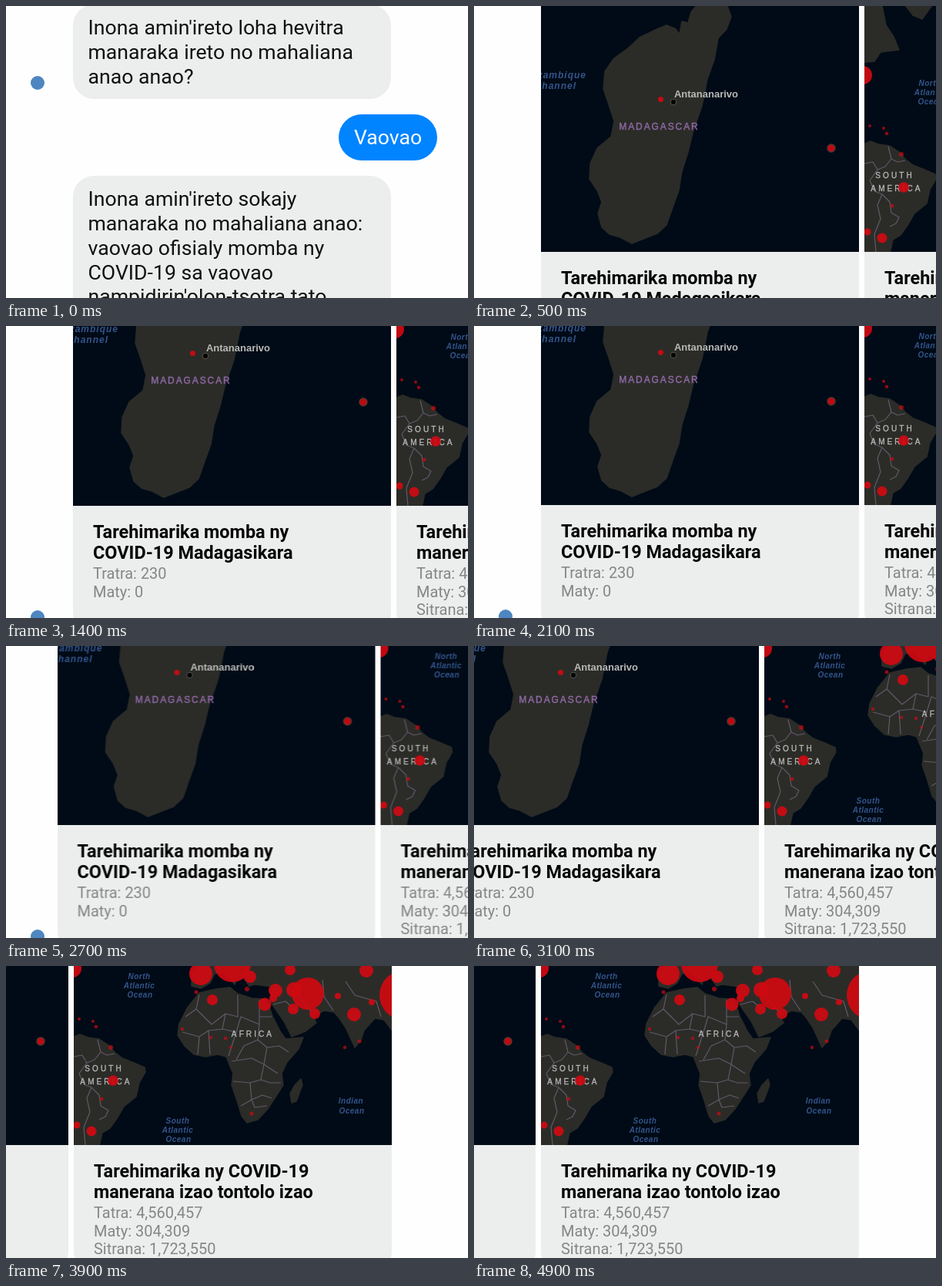
Write an HTML page that moves like this. It is 600x380 px and loops after 5000 ms.

```html
<!DOCTYPE html>
<html lang="mg">
<head>
<meta charset="utf-8">
<title>Chat</title>
<style>
html, body { margin: 0; width: 100%; height: 100%; overflow: hidden; background: #fefefe; }
body { position: relative; font-family: Roboto, sans-serif; color: #111; }
#stage { position: absolute; inset: 0; width: 600px; height: 380px; overflow: hidden; }
#chat, #cards { position: absolute; left: 0; top: 0; }
#chat { animation: scroll 5s step-end infinite; }
#cards { top: 507px; animation: swipe 5s step-end infinite; }

.msg, .me, .card, .avatar { position: absolute; box-sizing: border-box; }
.msg, .me { font-size: 26.65px; line-height: 31.7px; white-space: nowrap; }
.msg { left: 87px; width: 413px; padding: 15.4px 0 0 19.5px; border-radius: 27px; background: #eceeed; }
.me { left: 432px; top: 141px; width: 128px; height: 60px; border-radius: 30px;
  background: #0084ff; color: #fff; line-height: 61.5px; text-align: center; }
.avatar { left: 32px; width: 18px; height: 18px; border-radius: 50%; background: #4d86c0; }

.card { width: 413px; height: 579px; border-radius: 27px; overflow: hidden; background: #eceeed; white-space: nowrap; }
.card svg { display: block; background: #010b17; }
.card h2 { margin: 21px 0 0 26px; font-size: 23.45px; line-height: 27px; font-weight: 700; color: #060606; }
.card p { margin: 2.4px 0 0 26px; font-size: 19.95px; line-height: 23.2px; color: #858686; }

svg { font-family: "Liberation Sans", Arial, sans-serif; text-anchor: middle; }
svg > * { filter: blur(.5px); }
.land { fill: #2b2c28; stroke: #2b2c28; stroke-width: 1.5; stroke-linejoin: round; }
.border { fill: none; stroke: #625968; stroke-width: 1.2; stroke-linejoin: round; }
.case { fill: #cf0a12; fill-opacity: .93; }
.minor { opacity: .75; }
.sea { font-weight: 700; font-style: italic; font-size: 10px; letter-spacing: .5px; fill: #34558c; }
.region { font-size: 10px; letter-spacing: 3.1px; fill: #bababa; stroke: #bababa; stroke-width: .3; }

@keyframes scroll {
  0% { transform: translateY(0); }
  2% { transform: translateY(-125px); }
  6% { transform: translateY(-330px); }
  8% { transform: translateY(-530px); }
  10% { transform: translateY(-600px); }
  12% { transform: translateY(-618px); }
  14% { transform: translateY(-626px); }
  16% { transform: translateY(-630px); }
  18% { transform: translateY(-631.5px); }
  22% { transform: translateY(-645px); }
  24% { transform: translateY(-668px); }
  26% { transform: translateY(-682px); }
  28% { transform: translateY(-686px); }
  30%, 100% { transform: translateY(-687px); }
}
@keyframes swipe {
  0% { transform: translateX(0); }
  54% { transform: translateX(-20.5px); }
  56% { transform: translateX(-46px); }
  58% { transform: translateX(-75px); }
  60% { transform: translateX(-103px); }
  62% { transform: translateX(-130px); }
  64% { transform: translateX(-153px); }
  66% { transform: translateX(-174px); }
  68% { transform: translateX(-193px); }
  70% { transform: translateX(-210px); }
  72% { transform: translateX(-295px); }
  74% { transform: translateX(-380px); }
  76% { transform: translateX(-416px); }
  78% { transform: translateX(-419px); }
  80%, 100% { transform: translateX(-420px); }
}
</style>
</head>
<body>
<div id="stage">
<div id="chat">
  <div class="avatar" style="top:91px"></div>
  <div class="msg" style="top:-2px;height:123px">Inona amin'ireto loha hevitra<br>manaraka ireto no mahaliana<br>anao anao?</div>
  <div class="me">Vaovao</div>
  <div class="msg" style="top:221px;height:282px">Inona amin'ireto sokajy<br>manaraka no mahaliana anao:<br>vaovao ofisialy momba ny<br>COVID-19 sa vaovao<br>nampidirin'olon-tsotra tato<br>anatin'ity pejy ity momba<br>ny fiainana andavanandro<br>sy ny fahasalamana?</div>
  <div class="avatar" style="top:1056px"></div>

  <div id="cards">
    <div class="card" style="left:87px">
      <svg width="413" height="413" viewBox="87 -93 413 413">
        <path class="land" d="M170 85L182 68 200 55 215 41 238 30 250 25 262 30 267 37 270 20 278 22 282 8 290 -2 298 -40 306 -58
          318 -45 325 -20 329 0 334 14 328 30 317 42 312 70 303 95 296 130 284 165 278 190 270 215 266 240 258 262 250 285 238 296
          215 305 205 309 190 301 176 297 166 288 161 270 166 255 160 240 150 225 151 205 160 185 178 170 182 150 175 128 168 108Z"/>
        <text class="sea" x="146" y="94" style="font-size:12px;letter-spacing:1px;text-anchor:end">Mozambique</text>
        <text class="sea" x="133" y="108" style="font-size:12px;letter-spacing:1px;text-anchor:end">Channel</text>
        <text x="240.5" y="160.5" font-size="12" letter-spacing="1.9" fill="#9069a6" stroke="#9069a6" stroke-width=".4">MADAGASCAR</text>
        <circle cx="259" cy="125" r="3.8" fill="#050505" stroke="#55554f"/>
        <text x="301.5" y="119" font-size="13" font-weight="700" fill="#b9b9b7">Antananarivo</text>
        <circle class="case" cx="242.5" cy="121.5" r="3.5"/>
        <circle class="case" cx="464" cy="185" r="5" stroke="#57352f" stroke-width="1.5"/>
      </svg>
      <h2>Tarehimarika momba ny<br>COVID-19 Madagasikara</h2>
      <p>Tratra: 230<br>Maty: 0</p>
    </div>

    <div class="card" style="left:507px">
      <svg width="413" height="413" viewBox="87 -180 413 413">
        <g class="land">
          <path d="M80 -13L100 -15 108 -27 132 -30 125 -47 115 -62 110 -87 130 -110 100 -150 80 -150Z"/>
          <path d="M140 -88L150 -75 162 -70 180 -95 205 -120 215 -180 150 -180Z"/>
          <path d="M80 95L95 89 105 93 120 95 132 103 140 112 150 120 165 126 179 132 180 138 172 152 168 170 152 183 144 197 134 211 124 217 120 235 80 235Z"/>
          <path d="M250 35L272 30 290 28 300 36 318 42 335 43 340 50 345 65 355 85 362 95 385 93 379 108 364 125 357 140 359 155 348 172
            339 186 326 200 312 204 305 195 299 175 292 155 294 140 289 128 285 118 274 115 258 118 243 115 231 104 222 90 224 75 234 55Z"/>
          <path d="M382 147L384 155 376 176 370 178 368 166 374 155Z"/>
          <path d="M240 8L240 26 252 29 264 22 270 10 282 8 296 24 300 12 308 16 315 26 322 24 345 27 342 46 360 72 370 92 388 85 402 74
            398 66 412 58 425 60 432 68 440 80 452 106 460 96 464 84 478 68 490 70 505 90 505 -130 400 -125 330 -110 290 -90 270 -55 290 -45 262 -20 252 -4Z"/>
          <path d="M238 -30L252 -34 250 -50 240 -48Z"/>
        </g>
        <g class="border">
          <path d="M87 118L98 116 104 126 114 122 122 112 130 116 140 114M104 126L94 140 100 154 110 158 120 168 122 182 132 188 128 196 120 200M110 158L104 172 108 190 100 210 102 233M118 96L122 112"/>
          <path d="M250 37L246 56 232 66M246 56L266 76 284 62 300 66 300 38M284 62L280 82 262 84 250 92 228 86M262 84L264 115M250 92L248 115M280 82L298 86 304 66 328 76 328 44
            M328 66L344 66M328 76L326 96 338 106 354 104 366 112M298 86L288 117M326 96L308 104 298 122M338 106L334 128 352 140M292 124L318 120 334 128 330 148 342 152
            356 152M294 150L316 152 330 148M316 152L318 174 304 182M318 174L332 168 344 172M318 174L322 184 338 182"/>
          <path d="M346 50L362 46 378 60M372 26L384 46 398 62M410 18L412 40 424 58M440 20L452 38 480 46 486 66M350 -20L380 -6 420 -14 460 -2 500 -18M300 -50L310 -20 340 -8"/>
        </g>
        <g id="cases" class="case"></g>
        <g class="sea">
          <text x="172" y="16.5">North</text><text x="172" y="28.5">Atlantic</text><text x="173" y="40.5">Ocean</text>
          <text x="222" y="204.5">South</text><text x="222" y="216.5">Atlantic</text><text x="223" y="228.5">Ocean</text>
          <text x="447" y="179">Indian</text><text x="448" y="191.5">Ocean</text>
        </g>
        <g class="region">
          <text x="126.5" y="136.5">SOUTH</text><text x="129" y="153.5">AMERICA</text><text x="319.5" y="92">AFRICA</text>
        </g>
        <circle class="case" cx="138" cy="149" r="6.8"/>
      </svg>
      <h2>Tarehimarika ny COVID-19<br>manerana izao tontolo izao</h2>
      <p>Tatra: 4,560,457<br>Maty: 304,309<br>Sitrana: 1,723,550</p>
    </div>
  </div>
</div>
</div>
<script>
// x y radius of each circle on the world map
const cases = `85 3 12,94 69 2,112 72 2,116 79 2.3,135 106 3,123 173 2.5,110 215 6.5,91 207 4.5,
  252 10 15,293 -3 24,316 14 8,267 44 7,335 50 8.5,349 32 9,346 42 5,368 5 7,373 31 10,372 56 7,391 36 21,400 62 7,
  430 39 4,451 63 9,467 6 9,474 47 4,516 38 32,458 98 2.5,439 106 2.2,228 82 2.2,246 34 2.5,265 93 2.2,284 94 2.2,
  291 106 2,318 192 2.5,312 30 3,270 -30 18,340 -35 20`;
document.getElementById('cases').innerHTML = cases.split(',').map(c => {
  const [x, y, r] = c.trim().split(' ');
  return `<circle cx="${x}" cy="${y}" r="${r}"${r < 4 ? ' class="minor"' : ''}/>`;
}).join('');
</script>
</body>
</html>
```
